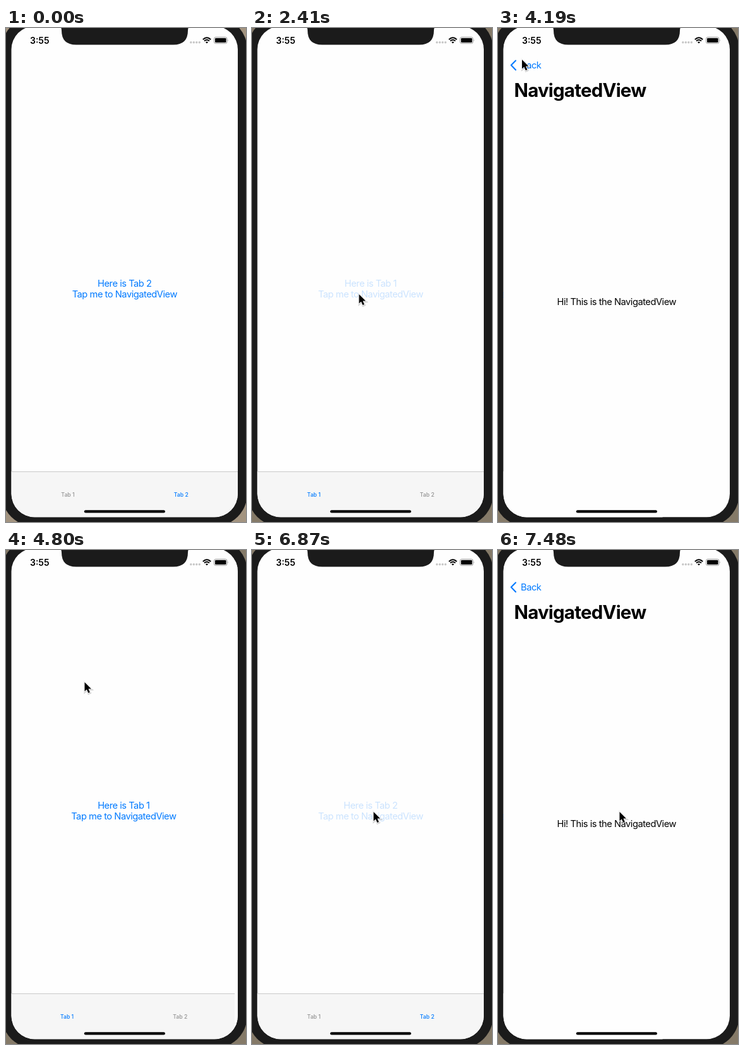
An HTML page that plays this animation: 380 by 781 pixels, repeating every 8000 ms.

```html
<!DOCTYPE html>
<html lang="en">
<head>
<meta charset="utf-8">
<title>Tab and navigation demo</title>
<style>
  html, body { margin: 0; width: 100%; height: 100%; overflow: hidden; }
  svg { display: block; width: 380px; height: 781px; }
  text { font-family: Inter, Roboto, sans-serif; white-space: pre; }
  .body { font-size: 14.7px; letter-spacing: -.48px; }
  .link { fill: #007aff; }
  .mid { text-anchor: middle; }
  .tab { font-size: 8.7px; font-weight: 500; text-anchor: middle; }
  .title { font-size: 29.4px; font-weight: 700; letter-spacing: -.75px; }
  .clock { font-size: 14px; font-weight: 600; }
</style>
</head>
<body>
<svg viewBox="0 0 380 781">
  <defs>
    <clipPath id="screen"><rect x="8.5" y="-3" width="358.5" height="776.3" rx="37"/></clipPath>
  </defs>
  <rect id="desktop" width="380" height="781"/>
  <rect x="-7" y="-18" width="389" height="806" rx="52" fill="#1b1b1b"/>

  <g clip-path="url(#screen)">
    <g id="root">
      <rect x="8" y="-3" width="360" height="777" fill="#fefefe"/>
      <g id="links" class="body link mid">
        <text id="heading" x="187.8" y="408.5"></text>
        <text x="187.8" y="426.3">Tap me to NavigatedView</text>
      </g>
      <rect x="8" y="701" width="360" height="73" fill="#f6f6f6"/>
      <path d="M8 701.5H368" stroke="#c9c9c9"/>
      <text id="tab1" class="tab" x="98" y="740.8">Tab 1</text>
      <text id="tab2" class="tab" x="277.3" y="740.8">Tab 2</text>
    </g>
    <rect id="dim" x="8" y="-3" width="360" height="777"/>

    <g id="pushed">
      <rect x="8.5" y="-3" width="360" height="777" fill="#fefefe"/>
      <text class="body mid" x="187.8" y="438.4">Hi! This is the NavigatedView</text>
    </g>
    <g id="bar">
      <text id="title" class="title" x="25.5" y="108.8">NavigatedView</text>
      <path id="chevron" d="M28 51.5L20.8 58.8L28 66.2" fill="none" stroke="#007aff" stroke-width="2.1" stroke-linecap="round" stroke-linejoin="round"/>
      <text id="back" class="body link" y="5.3">Back</text>
    </g>

    <path d="M82 -3Q88 -3 88 4Q88 26.5 111 26.5H265Q288 26.5 288 4Q288 -3 294 -3Z" fill="#1b1b1b"/>
    <text class="clock" x="38" y="24.6">3:55</text>
    <path d="M292.8 22.8h14" stroke="#c6c6c6" stroke-width="3.4" stroke-linecap="round" stroke-dasharray="0 4.5"/>
    <g fill="none" stroke="#000" stroke-width="2">
      <path d="M311.8 18.2Q318 12.4 324.2 18.2M314 20.6Q318 17 322 20.6"/>
      <path d="M318 24.6l-2.1-2.3q2.1-1.7 4.2 0z" fill="#000" stroke="none"/>
    </g>
    <rect x="329.5" y="14.5" width="20.5" height="10" rx="2.6" fill="none" stroke="#999"/>
    <rect x="331" y="16" width="17.5" height="7" rx="1.3"/>
    <path d="M351.3 17.9q1.4 1.6 0 3.2z" fill="#888"/>
    <rect x="123.8" y="762.3" width="128.2" height="4.2" rx="2.1"/>
  </g>

  <g id="cursor">
    <path d="M0 0V14.4L3.3 11.4L5.8 17L8.4 15.9L6 10.4H10.5Z" transform="translate(.4 1)" fill="none" stroke="#000" stroke-opacity=".18" stroke-width="3"/>
    <path d="M0 0V14.4L3.3 11.4L5.8 17L8.4 15.9L6 10.4H10.5Z" stroke="#fff" stroke-width="1.8" paint-order="stroke"/>
  </g>
</svg>
<script>
const LOOP = 8000, TICK = LOOP / 90;
const $ = id => document.getElementById(id);
const slide = (id, x, y = 0) => $(id).setAttribute('transform', `translate(${x} ${y})`);
const fade = (id, a) => $(id).setAttribute('opacity', Math.max(0, Math.min(1, a)));

// Pointer stops: tick, x, y, and whether the way there is linear
const stops = [
  [3, 31, 510], [9, 93, 741], [17, 93, 741], [26, 169.5, 421],
  [38, 169.5, 421], [47, 38, 50], [51, 38, 50], [54, 124.5, 209, 1],
  [58, 252, 669, 1], [59, 289, 680, 1], [61, 288, 746, 1], [63, 281.5, 732.5],
  [67, 281.5, 732.5], [75, 192.5, 414]
];

function pointer(tick) {
  const i = stops.findIndex(s => s[0] > tick);
  if (i < 0) return stops.at(-1).slice(1, 3);
  const a = stops[i - 1], b = stops[i];
  let k = (tick - a[0]) / (b[0] - a[0]);
  if (!b[3]) k = k * k * (3 - 2 * k);
  return [1, 2].map(j => a[j] + (b[j] - a[j]) * k);
}

// Critically damped spring running from 1 to 0
function spring(ms) {
  if (ms <= 0) return 1;
  const w = ms * 0.01825, p = (1 + w) * Math.exp(-w);
  return p < 0.002 ? 0 : p;
}

// How far the second page is off to the right: 1 hidden, 0 in place
function pageOffset(ms) {
  if (ms < 4455) return spring(ms - 2540);
  if (ms < 6800) return 1 - spring(ms - 4455);
  return spring(ms - 6894);
}

function draw(now) {
  const tick = Math.floor((now % LOOP + 1) / TICK), ms = tick * TICK;
  const within = (a, b) => tick >= a && tick < b;
  const p = pageOffset(ms);
  const tab = within(16, 66) ? 1 : 2;

  $('desktop').setAttribute('fill', tick < 14 ? '#a39480' : '#857a68');
  $('heading').textContent = 'Here is Tab ' + tab;
  for (const n of [1, 2]) $('tab' + n).setAttribute('fill', n === tab ? '#007aff' : '#929292');
  fade('links', within(27, 29) || tick === 77 ? 0.2 : 1);

  slide('root', -107.5 * (1 - p));
  fade('dim', 0.1 * (1 - p));
  slide('pushed', 358.5 * p);
  fade('bar', p < 1 ? 1 : 0);
  slide('title', 375 * p);
  const pressed = within(49, 51) ? 0.25 : 1;
  fade('chevron', pressed * (1 - p / 0.09));
  fade('back', pressed * (1 - 2 * p));
  $('back').setAttribute('transform', `translate(${36 - 27 * p} ${58.7 + 39 * p}) scale(${1 + 1.15 * p})`);

  fade('cursor', tick < 3 ? 0 : 1);
  if (tick >= 3) slide('cursor', ...pointer(tick));
}

function loop() {
  draw(performance.now());
  requestAnimationFrame(loop);
}
loop();
</script>
</body>
</html>
```
